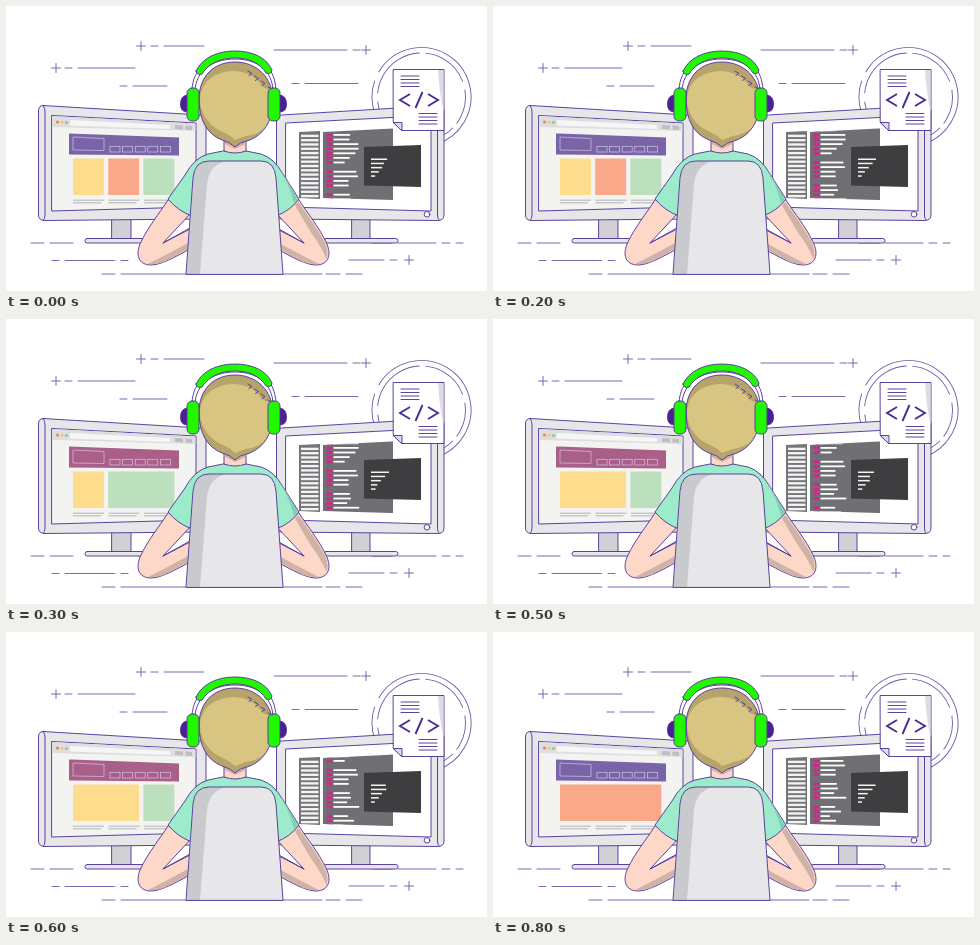
Recreate the animation shown at these times as an HTML page. Size 481 px wide and 285 px high, loop 900 ms.

```html
<!DOCTYPE html>
<html lang="en">
<head>
<meta charset="utf-8">
<title>Developer at work</title>
<style>
  html, body { margin: 0; width: 100%; height: 100%; overflow: hidden; background: #fff; }
  svg { display: block; width: 100%; height: 100%; }
  .ink { stroke: #55399b; stroke-width: .95; stroke-linejoin: round; stroke-linecap: round; }
  .light { stroke: #6d58aa; stroke-width: .9; }
  .metal { fill: #e7e7ea; }
  .none { fill: none; }
  .skin { fill: #fdd7c7; }
  .skinShade { fill: #cfb3a7; }
  .green { fill: #21f800; }
</style>
</head>
<body>
<svg viewBox="0 0 481 285" preserveAspectRatio="none">
  <defs>
    <path id="editorShape" d="M317 126L387 122.500V194L317 192Z"/>
    <clipPath id="editorClip"><use href="#editorShape"/></clipPath>
    <path id="headShape" d="M193 93C193 70 208 56 229 56S267 71 267 95C267 115 257 130 241 135Q234 136 229 141Q224 136 216 134C201 128 193 114 193 93Z"/>
    <clipPath id="headClip"><use href="#headShape"/></clipPath>
    <path id="chairShape" d="M180 268L187 172Q188.500 155 203 155H255Q268.500 155 270 172L277 268Z"/>
    <path id="monitorShape" d="M37 99.500L195 109Q200 109 200 114V208Q200 213 195 213L38 214.500Q32.500 214 32.500 209V105Q32.500 99.500 37 99.500ZM37.500 100Q39 102 39 106V209Q39 213 37.500 214"/>
    <g id="arm">
      <path class="ink skin" d="M162 194C153 208 142 221 135 236C129 248 132 259 145 259C155 259 169 251 182 244L184 223L157 237L185 207Z"/>
      <path class="skinShade" d="M142 258Q148 259 158 256L181 243.500L182 237Q160 249 142 258Z"/>
      <path class="ink none" d="M157 237L184 222"/>
    </g>
  </defs>
  <rect width="481" height="285" fill="#fff"/>
  <path id="dashes" class="ink light none"/>

  <!-- badge rings -->
  <g class="light none" transform="rotate(-150 415.500 91)">
    <circle cx="415.500" cy="91" r="49.500" pathLength="100" stroke-dasharray="73 3 21 3"/>
    <circle cx="415.500" cy="91" r="44" pathLength="100" stroke-dasharray="16 2 18 3 13 2"/>
  </g>

  <!-- monitor stands -->
  <g class="ink">
    <path d="M106 211H125V233H106ZM346 211H364V233H346Z" fill="#d0d0d5"/>
    <rect class="metal" x="79" y="232.500" width="60" height="4.500" rx="2.200"/>
    <rect class="metal" x="318" y="232.500" width="74" height="4.500" rx="2.200"/>
  </g>

  <!-- left monitor -->
  <use href="#monitorShape" class="ink metal"/>
  <path class="ink" d="M46 109.500L190 117V201L46 205Z" fill="#f3f3f2"/>
  <path d="M46.500 110L189.500 117.500V125L46.500 121Z" fill="#dedee0"/>
  <path d="M64 114L164 119V123L64 119.500Z" fill="#f6f6f6"/>
  <path d="M169 119L177 119.400V123.500L169 123ZM179.500 119.500L186 120V124L179.500 123.600Z" fill="#bebec2"/>
  <circle cx="51.500" cy="116" r="1.500" fill="#f07866"/>
  <circle cx="56" cy="116.200" r="1.500" fill="#f5c95c"/>
  <circle cx="60.500" cy="116.400" r="1.500" fill="#89ca88"/>
  <path id="header" d="M63 127.500L173 131.500V149.500L63 148.500Z"/>
  <g id="headerBoxes" fill="none" stroke="#d2c5e3" stroke-width=".7"></g>
  <g id="cards"></g>
  <g id="captions" fill="#bdbdc0"></g>

  <!-- right monitor -->
  <use href="#monitorShape" class="ink metal" transform="matrix(-1 0 0 1 470.500 0)"/>
  <path class="ink" d="M280 117L425 109.500V205L280 201Z" fill="#fff"/>
  <circle class="ink" cx="421" cy="208.300" r="2.800" fill="#fff"/>
  <path d="M293 126L314 125V193L293 192Z" fill="#747578"/>
  <use href="#editorShape" fill="#6f7073"/>
  <g id="sidebar" fill="#f2f2f2"></g>
  <g clip-path="url(#editorClip)"><g id="code"></g></g>
  <path d="M358 141L415 139V181L358 179.500Z" fill="#3e3e40"/>
  <g id="terminal" fill="#f5f5f5"></g>

  <!-- code page -->
  <path class="ink" d="M387.500 63.500H438V124.500H396L387.500 116.500Z" fill="#fff"/>
  <path d="M432 64H437.500V106Q433 84 432 64Z" fill="#dcdce2"/>
  <path class="ink" d="M387.500 116.500H396V124.500Z" fill="#dcd8e8"/>
  <path id="pageLines" class="ink none"/>
  <path d="M404 88L394 94L404 100M422 88L432 94L422 100M416.500 86L409.500 102" fill="none" stroke="#4b2c92" stroke-width="1.900"/>

  <!-- person -->
  <use href="#arm"/>
  <use href="#arm" transform="matrix(-1 0 0 1 455 0)"/>
  <path class="skinShade" d="M292.500 196C302 210 312 223 319 237Q323 246 320.500 253Q315 240 306 228Q296 212 289 199Z"/>
  <path class="ink" d="M217 145L202 148Q188 152 179 169L162 193Q172 205 186 210H270Q284 205 293 193L277 168Q268 152 255 148L240 145Z" fill="#9cebcb"/>
  <path d="M272 161Q283 177 288 197L292 193L277 168Z" fill="#84d0b5"/>
  <path class="ink skin" d="M218 130V145Q229 149 240 145V130Z"/>
  <path class="skinShade" d="M219 135H239.500V138L229 143L219 138Z"/>
  <use href="#chairShape" class="metal"/>
  <path d="M180.500 268L187.500 172Q189 155 203 155H220Q203 159 201 178L194 268Z" fill="#c9cacd"/>
  <use href="#chairShape" class="ink none"/>

  <use href="#headShape" fill="#b7a36c"/>
  <path clip-path="url(#headClip)" d="M194 93C195 76 208 66 227 65Q246 65 257 81L268 86V102C266 119 255 128 240 130L229 134Q224 129 217 126C204 121 194 108 194 93Z" fill="#d8c581"/>
  <use href="#headShape" class="ink none"/>
  <path id="strands" class="ink none"/>

  <!-- headphones -->
  <path class="ink none" d="M186 84C187 62 203 48 229 48S269 62 270 84M189 84C190 66 205 53 229 53S266 66 267 84"/>
  <path class="ink green" d="M190 65C196 52 211 45 229 45S261 52 266 64Q265 69 260 67C254 57 243 52 229 52S203 57 196 68Q191 70 190 65Z"/>
  <path class="ink" d="M181 89Q174.500 90 174.500 98T181 106ZM274 89Q280.500 90 280.500 98T274 106Z" fill="#4b1f96"/>
  <rect class="ink green" x="181" y="82" width="12" height="33" rx="5"/>
  <rect class="ink green" x="262" y="82" width="12" height="33" rx="5"/>
</svg>
<script>
const byId = id => document.getElementById(id);
const setPath = (id, ...parts) => byId(id).setAttribute('d', parts.join(''));
const rect = (x, y, w, h, fill) =>
  `<rect x="${x}" y="${y}" width="${w}" height="${h}"${fill ? ` fill="${fill}"` : ''}/>`;
const repeat = (count, make) => Array.from({ length: count }, (_, i) => make(i)).join('');

// Repeatable pseudo-random number in [0, 1).
const noise = n => {
  const v = Math.sin(n * 12.9898 + 4.1) * 43758.5453;
  return v - Math.floor(v);
};

// A short dash followed by a long one, running right (1) or left (-1).
const trail = (x, y, direction, long, short = 7) =>
  `M${x} ${y}h${direction * short}m${direction * 6} 0h${direction * long}`;
const plus = (x, y) => `M${x - 4.5} ${y}h9M${x} ${y - 4.5}v9`;

setPath('dashes',
  plus(135, 40), trail(145, 40, 1, 40),
  plus(50, 62), trail(59, 62, 1, 57),
  trail(114, 80, 1, 34),
  plus(360, 44), trail(354, 44, -1, 73),
  trail(286, 77.5, 1, 53),
  trail(25, 237, 1, 23, 13), trail(457, 237, -1, 8), trail(430, 237, -1, 20, 38),
  trail(46, 254.5, 1, 49), trail(122, 254.5, -1, 0),
  plus(403, 254), trail(391, 254, -1, 35),
  trail(96, 268, 1, 201, 13), trail(356, 268, -1, 14, 16));

setPath('pageLines', repeat(4, i => `M395 ${70 + i * 3.5}h18M413 ${107.5 + i * 3.5}h18`));
setPath('strands', repeat(3, i => `M${242 + i * 6.5} ${65 + i * 5}l4 2.500l-3 2`), 'M262 81l4 2');

byId('headerBoxes').innerHTML = '<path d="M67 131L98 132.500V144.500L67 144Z"/>' +
  repeat(5, i => rect(104 + i * 12.6, 140.3, 10, 5.7));
byId('captions').innerHTML = repeat(3, i =>
  rect(67 + i * 35.5, 193.6, 31, 1.2) + rect(67 + i * 35.5, 196.2, 28, 1.2));
byId('sidebar').innerHTML = repeat(15, i => rect(295, 128.7 + i * 4.3, 17.5, 2.4));

const rowHeight = 4.6;
byId('code').innerHTML = repeat(24, i => {
  if (i % 5 === 2 && i > 5) return '';
  const y = 128 + i * rowHeight;
  return rect(320.5, y - .4, 6, 2.8, '#d5248b') + rect(327.5, y, 9 + noise(i) * 20, 1.8, '#fff');
});

const terminalRows = step => repeat(5, i =>
  rect(365, 152.5 + i * 4.2, (19 - i * 3.6) * (.75 + .25 * noise(i + step)), 1.5));

const purple = '#7964a8', plum = '#aa5f88';
const yellow = '#fddc8e', orange = '#f9a98a', mint = '#bce0bd';
// Each card is [colour, columns it spans].
const layouts = [
  { header: purple, cards: [[yellow, 1], [orange, 1], [mint, 1]] },
  { header: plum, cards: [[yellow, 1], [mint, 2]] },
  { header: plum, cards: [[yellow, 2], [mint, 1]] },
  { header: purple, cards: [[orange, 3]] }
];
const columnPitch = 35.2, columnGap = 4.3;

function drawCards(cards) {
  let column = 0;
  byId('cards').innerHTML = cards.map(([fill, span]) => {
    const x = 67 + column * columnPitch;
    column += span;
    return rect(x, 152.5, span * columnPitch - columnGap, 36.5, fill);
  }).join('');
}

const start = performance.now();
let shownStep = -1;
function draw(now) {
  const step = Math.floor((Math.max(0, now - start) % 900) / 100);
  if (step !== shownStep) {
    shownStep = step;
    const layout = layouts[Math.floor(step * layouts.length / 9)];
    byId('header').setAttribute('fill', layout.header);
    drawCards(layout.cards);
    byId('code').setAttribute('transform', `translate(0 ${-step * rowHeight})`);
    byId('terminal').innerHTML = terminalRows(step);
  }
  requestAnimationFrame(draw);
}
draw(start);
</script>
</body>
</html>
```
